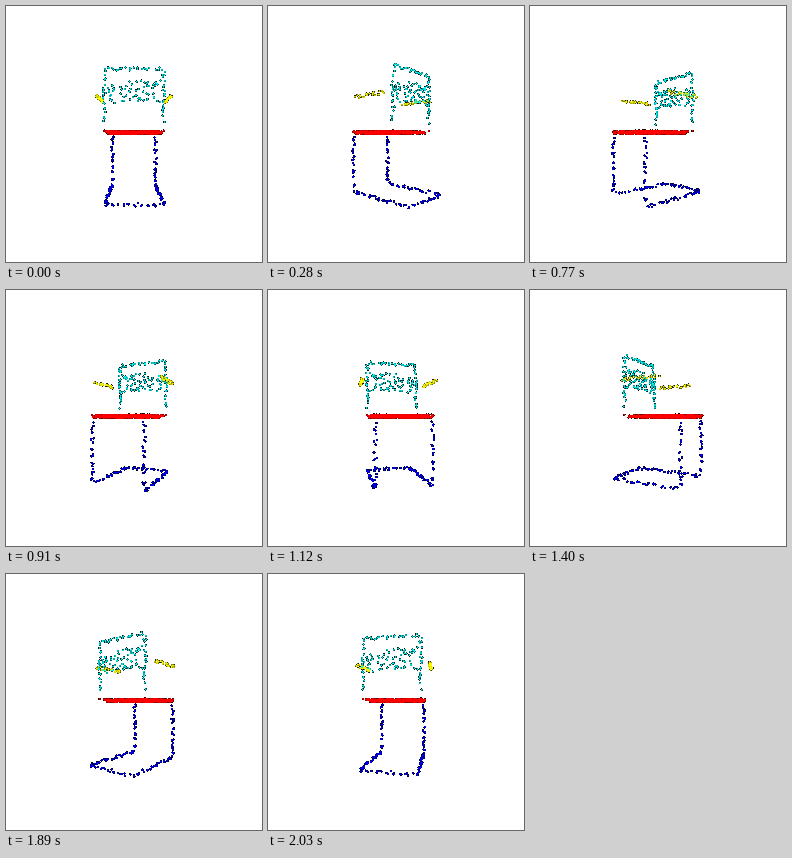
A matplotlib script for the animation above (2100 ms loop, 256x256 px).

```python
import numpy as np
import matplotlib.pyplot as plt
from matplotlib.animation import FuncAnimation

SIZE, FRAMES, STEP_MS = 256, 30, 70
FOCAL = SIZE / 2 / np.tan(np.radians(30))  # 60 degree field of view
RADIUS = 1.28

# Chair dimensions in pixels at the pivot depth: x across, y up, z to the rear
LEG_X, SEAT_X, ARM_X = 25, 27, 34
FRONT, BACK, TAIL = -36, 21, 37
FLOOR, SEAT_Y, ARM_Y, TOP = -59, 1.5, 35, 59

rng = np.random.default_rng(11)


def rounded(corners, r=5, steps=8):
    """Polyline whose inner corners are replaced by quadratic curves."""
    pts = np.array(corners, float)
    t = np.linspace(0, 1, steps)[:, None]
    path = [pts[:1]]
    for a, b, c in zip(pts, pts[1:], pts[2:]):
        p = b + r * (a - b) / np.linalg.norm(a - b)
        q = b + r * (c - b) / np.linalg.norm(c - b)
        path.append((1 - t) ** 2 * p + 2 * t * (1 - t) * b + t ** 2 * q)
    return np.vstack(path + [pts[-1:]])


def tube(path, n, r=1.4):
    """Scatter n points on a tube that follows a path."""
    path = np.asarray(path, float)
    length = np.r_[0, np.cumsum(np.linalg.norm(np.diff(path, axis=0), axis=1))]
    s = (np.arange(n) + rng.normal(0.5, 0.8, n)) / n * length[-1]
    pts = np.stack([np.interp(s, length, axis) for axis in path.T], axis=1)
    off = rng.normal(size=(n, 3))
    return pts + r * off / np.linalg.norm(off, axis=1, keepdims=True)


def mirrored(half):
    """Continue half a path with its reflection in x."""
    return half + [(-x, y, z) for x, y, z in reversed(half)]


def make_base():
    half = [(LEG_X, y, z) for y, z in ((-2, FRONT), (FLOOR, FRONT), (FLOOR, TAIL))]
    return tube(rounded(mirrored(half)), 130)


def make_back():
    half = [(SEAT_X, 12, BACK), (SEAT_X, TOP, BACK)]
    frame = tube(rounded(mirrored(half)), 66)
    panel = rng.uniform((-24, 28, BACK - 1), (24, 49, BACK + 1), (64, 3))
    return np.vstack([frame, panel])


def make_arms():
    return np.vstack([tube([(x, ARM_Y, -21), (x, ARM_Y, BACK - 2)], 24)
                      for x in (-ARM_X, ARM_X)])


def make_seat():
    """Thin slab with a superellipse outline."""
    p = rng.uniform(-1, 1, (850, 3))
    p = p[p[:, 0] ** 10 + p[:, 2] ** 10 < 1]
    slab = p * (SEAT_X, 1.4, 29.5) + (0, SEAT_Y, -9.5)
    studs = [(x, 3, BACK) for x in (-SEAT_X, SEAT_X)]
    return np.vstack([slab, studs])


parts = [(make_base(), (0, 0, 1)), (make_back(), (0, 1, 1)),
         (make_arms(), (1, 1, 0)), (make_seat(), (1, 0, 0))]
points = np.vstack([p for p, _ in parts])
colors = np.vstack([np.tile(c, (len(p), 1)) for p, c in parts]).astype(float)


def project(angle):
    x, y, z = points.T
    c, s = np.cos(angle), np.sin(angle)
    depth = z * c - x * s
    scale = FOCAL / (FOCAL - depth)
    return SIZE / 2 + (x * c + z * s) * scale, SIZE / 2 - y * scale, depth


def render(i):
    """Blend soft discs back to front; touched pixels start from black."""
    u, v, depth = project(2 * np.pi * i / FRAMES)
    img = np.zeros((SIZE, SIZE, 3))
    hit = np.zeros((SIZE, SIZE), bool)
    grid = np.arange(-2, 3)
    for k in np.argsort(depth):
        cols, rows = int(u[k]) + grid, int(v[k]) + grid
        d2 = (cols + 0.5 - u[k]) ** 2 + ((rows + 0.5 - v[k]) ** 2)[:, None]
        alpha = np.clip(1 - d2 / RADIUS ** 2, 0, 1)
        area = np.ix_(rows, cols)
        img[area] += alpha[..., None] * (colors[k] - img[area])
        hit[area] |= alpha > 0
    img[~hit] = 1
    return img


fig = plt.figure(figsize=(SIZE / 100, SIZE / 100), dpi=100, facecolor="white")
ax = fig.add_axes([0, 0, 1, 1])
ax.axis("off")
view = ax.imshow(render(0), interpolation="nearest", aspect="auto")


def update(i):
    view.set_data(render(i))
    return [view]


anim = FuncAnimation(fig, update, frames=FRAMES, interval=STEP_MS,
                     repeat=True, repeat_delay=0)
plt.show()
```
